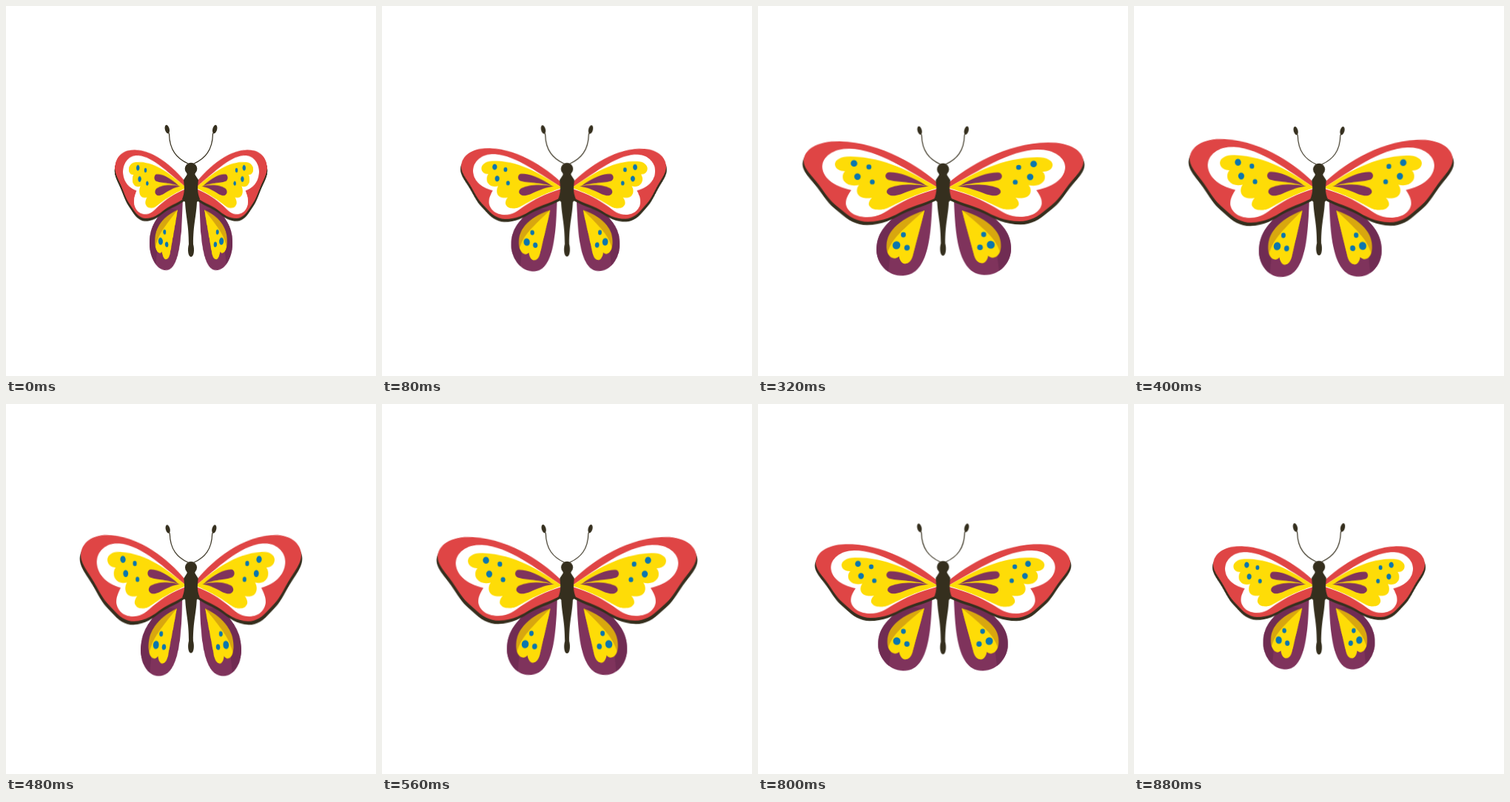
Write an HTML page that moves like this. It is 500x500 px and loops after 960 ms.

```html
<!DOCTYPE html>
<html lang="en">
<head>
<meta charset="utf-8">
<title>Butterfly</title>
<style>
  html, body { margin: 0; width: 100%; height: 100%; overflow: hidden; background: #fff; }
  .stage { position: relative; width: 500px; height: 500px; overflow: hidden; }
  svg { position: absolute; overflow: visible; }
  .wing { top: 154px; width: 200px; height: 240px; transform-origin: 0 100px; }
  #left { left: 245px; }
  #right { left: 255px; }
  #body { left: 0; top: 0; width: 500px; height: 500px; transform-origin: 250px 254px; }
  .dark { fill: #352f1e; }
  .red { fill: #df4545; }
  .white { fill: #fff; }
  .yellow { fill: #fedc07; }
  .mustard { fill: #d8a70f; }
  .purple { fill: #7f335c; }
  .shade { fill: #702c53; }
  .blue { fill: #0b76ae; }
  .feeler { fill: none; stroke: #352f1e; stroke-width: 1.2; }
</style>
</head>
<body>
<div class="stage">
  <svg id="left" class="wing" viewBox="0 -100 200 240">
    <defs>
      <path id="fore" d="M0,-13 C30,-38 80,-67 135,-67 C165,-67 180,-54 180,-42 C180,-31 171,-25 156.5,-5 C147,9 142,13 132.500,20.500 C123,29 112,36 98,36 C78,36 64,29 50,22 C35,15 15,11 0,3Z"/>
    </defs>
    <g id="wing">
      <path class="purple" d="M8,4 L10,10 C12,50 14,108 51,108 C73,108 87,90 87,72 C87,48 70,36 50,20Z"/>
      <path class="shade" d="M50,20 C70,36 87,48 87,72 C87,84 81,95 71,102 L68,76 L20,22Z"/>
      <path class="mustard" d="M21,22 C27,45 33,65 37,80 C40,95 54,97 56.500,82 C62,88 73,84 73.500,70 C75,52 60,34 21,22Z"/>
      <path class="yellow" d="M21,22 C27,45 33,65 37,80 C40,95 54,97 56.500,82 C61,87 70,84 72,76 C66,58 50,46 21,22Z"/>
      <g class="blue">
        <circle cx="50.500" cy="54" r="3.400"/>
        <circle cx="60" cy="67.500" r="5.300"/>
        <circle cx="45.500" cy="71.200" r="3.800"/>
      </g>
      <use href="#fore" class="dark" x="1.400" y="4.200"/>
      <use href="#fore" class="red"/>
      <path class="white" d="M3,-9 C44,-31 85,-58 122,-58 C144,-58 157,-46 157,-35 C157,-22 145,-10 120,-5 C125,2 127.500,7 127,13 C125,24 113,30 99,30 C84,30 76,24 64,17 C48,8 30,0 3,-7Z"/>
      <path class="yellow" d="M3,-9 C40,-29 75,-48 121,-48 C134,-48 141,-43 141,-38 C141,-32 135,-29 128,-29 C132,-26 132,-19 129,-16 C125,-11 118,-10 110,-11.500 C114,-7 113,-1 111,1 C107,6 100,6 93,5 C98,10 98,14 96,16 C93,20 88,20.500 82,20.500 C69,20.500 62,9 3,-8Z"/>
      <path class="purple" d="M18,-11 C38,-23 56,-28.500 69,-28.500 C76,-28.500 77,-20.500 71,-18.500 C58,-15 46,-17 18,-11Z"/>
      <path class="purple" d="M15,-10.500 C36,-14 57,-13 68,-8.500 C75,-6 75,0 68,2 C54,4 44,-7 15,-10.500Z"/>
      <g class="blue">
        <circle cx="116.500" cy="-39.300" r="4.300"/>
        <circle cx="97" cy="-35" r="3.300"/>
        <circle cx="112" cy="-22.300" r="4.200"/>
        <circle cx="92.500" cy="-15.600" r="3.200"/>
      </g>
    </g>
  </svg>
  <svg id="right" class="wing" viewBox="0 -100 200 240"><use href="#wing"/></svg>
  <svg id="body" viewBox="0 0 500 500">
    <g id="antenna">
      <path class="feeler" d="M246,213 C231,206 221,195 220.500,173 L219,170"/>
      <ellipse class="dark" cx="217.800" cy="166.500" rx="3" ry="5.900" transform="rotate(-14 217.800 166.500)"/>
    </g>
    <use href="#antenna" transform="matrix(-1 0 0 1 500 0)"/>
    <circle class="dark" cx="250" cy="220" r="8.300"/>
    <path class="dark" d="M244.500,225 L244.500,228 L240,235 C241,245 242,251 238,261 L242,265 C243,285 247,295 247,322 C245,329 246,339 250,339 C254,339 255,329 253,322 C253,295 257,285 258,265 L262,261 C258,251 259,245 260,235 L255.500,228 L255.500,225Z"/>
  </svg>
</div>
<script>
  const STEP = 80, HALF = 6;
  const [left, right, body] = ['left', 'right', 'body'].map(id => document.getElementById(id));

  // bend > 0 starts fast, bend < 0 starts slowly
  const angle = (u, bend) => -50.4 + 98.7 * (u + bend * u * (1 - u));
  const flap = (el, side, deg) => {
    el.style.transform = `scaleX(${side}) perspective(800px) rotateY(${-deg}deg)`;
  };

  function draw() {
    const n = Math.floor(performance.now() / STEP) % (2 * HALF);
    const u = 1 - Math.abs(n - HALF) / HALF;
    flap(left, -1, angle(u, 0.205));
    flap(right, 1, angle(u, n < HALF ? -0.137 : 0.205));
    body.style.transform = `scale(${1 - 0.028 * u})`;
    requestAnimationFrame(draw);
  }
  draw();
</script>
</body>
</html>
```
